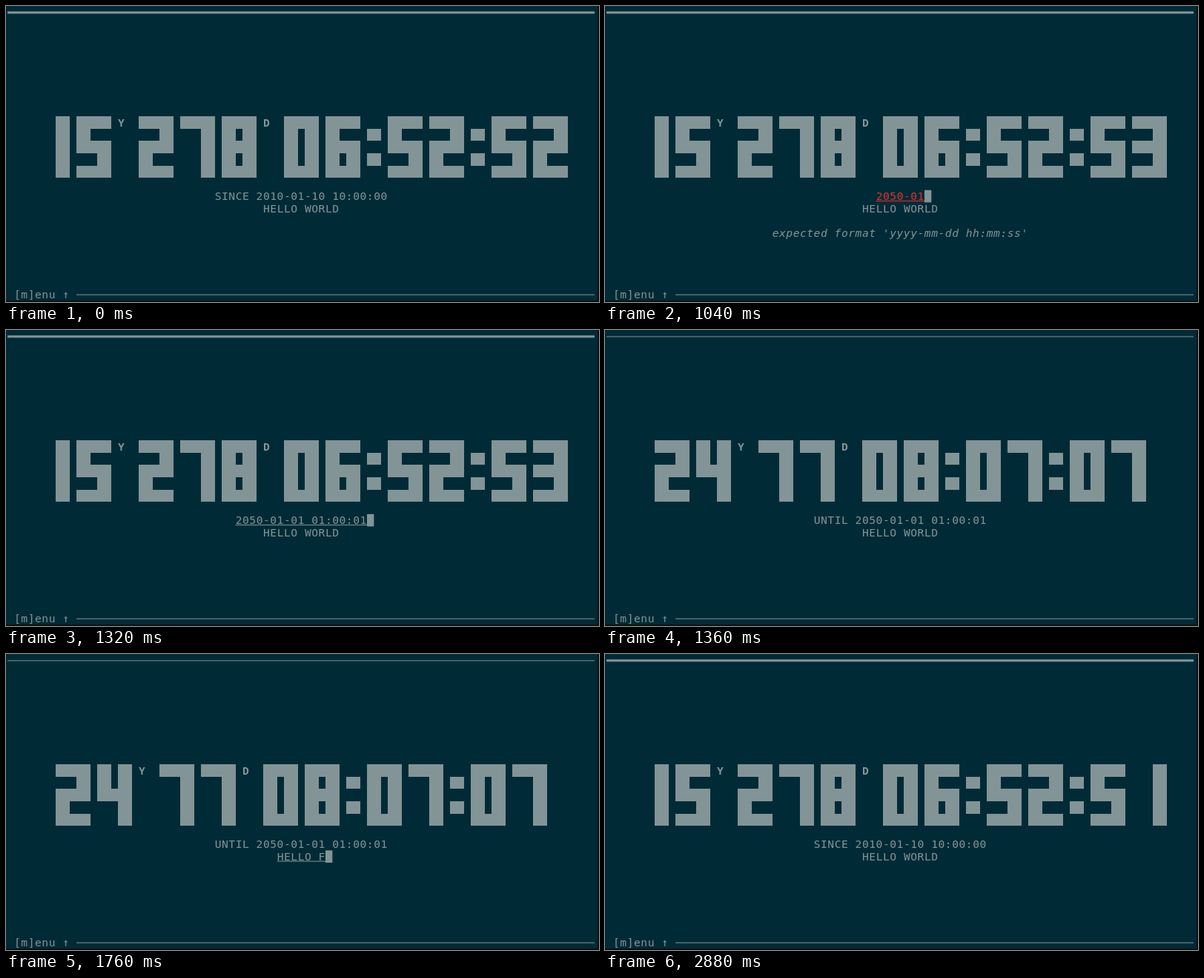
An HTML page for the animation above (3 s loop, 800 by 400 pixels).

```html
<!DOCTYPE html>
<html lang="en">
<head>
<meta charset="utf-8">
<title>Event clock</title>
<style>
  html, body { margin: 0; width: 100%; height: 100%; overflow: hidden; background: #111; }
  svg { display: block; width: 800px; height: 400px; }
  text {
    font: 14.67px "DejaVu Sans Mono", monospace;
    letter-spacing: 0.502px;
    white-space: pre;
  }
  .bold { font-weight: bold; }
  .italic { font-style: italic; }
</style>
</head>
<body>
<svg id="screen" viewBox="0 0 800 400"></svg>
<script>
const LOOP = 3000, COLS = 85, CELL_W = 28 / 3, CELL_H = 16.6;
const BG = '#002b36', FG = '#839496', RED = '#dc322f';
const OLD_DATE = '2010-01-10 10:00:00', NEW_DATE = '2050-01-01 01:00:01';
const OLD_TITLE = 'HELLO WORLD', NEW_TITLE = 'HELLO FUTURE';
const KEY_MS = 23;

// Five rows per digit, named by which of the left, middle and right parts are lit.
const ROWS = { f: '11111', b: '11011', r: '00011', l: '11000' };
const DIGITS = ['fbbbf', 'rrrrr', 'frflf', 'frfrf', 'bbfrr', 'flfrf', 'flfbf', 'frrrr', 'fbfbf', 'fbfrf'];

const screen = document.getElementById('screen');
const x = col => 5 / 3 + col * CELL_W;
const y = row => row * CELL_H - 0.2;
const centre = length => Math.floor((COLS - length) / 2);

const rect = (left, top, width, height, fill = FG) =>
  `<rect x="${left}" y="${top}" width="${width}" height="${height}" fill="${fill}"/>`;

const label = (str, col, row, fill = FG, style = '') =>
  `<text x="${x(col)}" y="${y(row) + 13.3}" fill="${fill}" class="${style}">${str}</text>`;

const centred = (str, row, style) => label(str, centre(str.length), row, FG, style);

function block(col, row, cols) {
  const left = Math.round(x(col)), top = Math.round(y(row));
  return rect(left, top, Math.round(x(col + cols)) - left, Math.round(y(row + 1)) - top);
}

function digit(n, col) {
  let out = '';
  [...DIGITS[n]].forEach((key, i) => {
    for (const run of ROWS[key].matchAll(/1+/g)) out += block(col + run.index, 9 + i, run[0].length);
  });
  return out;
}

function clock(str, col) {
  let out = '';
  for (const ch of str) {
    if (ch === ':') out += block(col, 10, 2) + block(col, 12, 2);
    else if (/\d/.test(ch)) out += digit(+ch, col);
    else out += label(ch, col, 9, FG, 'bold');
    col += /\d/.test(ch) ? 6 : 3;
  }
  return out;
}

// An input line: underlined text with a block cursor at the given offset, or none.
function input(str, row, cursor, fill = FG) {
  const col = centre(str.length);
  let out = label(str, col, row, fill) + rect(x(col), y(row) + 14.2, str.length * CELL_W, 1, fill);
  if (cursor !== null) {
    out += rect(x(col + cursor), y(row), CELL_W, CELL_H);
    if (cursor < str.length) out += label(str[cursor], col + cursor, row, BG);
  }
  return out;
}

function dateLine(t) {
  if (t < 880 || t >= 2880) return centred('SINCE ' + OLD_DATE, 15);
  if (t < 920) return input(OLD_DATE, 15, null);
  if (t >= 1400 && t < 1440) return input(NEW_DATE, 15, null);
  if (t >= 1360) return centred('UNTIL ' + NEW_DATE, 15);

  const typed = t < 960 ? OLD_DATE.slice(0, 9)
    : NEW_DATE.slice(0, Math.floor(14 + (t - 1200) / KEY_MS));
  const valid = typed.length === NEW_DATE.length;
  return input(typed, 15, typed.length, valid ? FG : RED)
    + (valid ? '' : centred("expected format 'yyyy-mm-dd hh:mm:ss'", 18, 'italic'));
}

function titleLine(t) {
  if (t < 1440 || t >= 2880) return centred(OLD_TITLE, 16);
  if (t >= 1920) return centred(NEW_TITLE, 16);
  const typed = t < 1480 ? OLD_TITLE
    : t < 1520 ? OLD_TITLE.slice(0, 5)
    : t < 1600 ? ''
    : NEW_TITLE.slice(0, Math.floor(1 + (t - 1600) / KEY_MS));
  return input(typed, 16, t === 1600 ? 0 : typed.length);
}

function draw(t) {
  const past = t < 1360 || t >= 2880;
  const seconds = t >= 2880 ? 51 : t < 960 ? 52 : 53;
  screen.innerHTML = rect(0, 0, 798, 398, BG)
    + (past ? rect(2, 7.3, 792, 3.1) : rect(2, 8.5, 792, 1))
    + (past ? clock('15Y278D06:52:' + seconds, 4)
            : clock('24Y77D08:07:0' + (t < 1920 ? 7 : 6), 7))
    + dateLine(t) + titleLine(t)
    + label('[m]enu ↑', 1, 23) + rect(95, 389.7, 699, 1);
}

let shown = -1;
function tick() {
  const t = Math.floor(performance.now() % LOOP / 40) * 40;
  if (t !== shown) draw(shown = t);
  requestAnimationFrame(tick);
}
tick();
</script>
</body>
</html>
```
